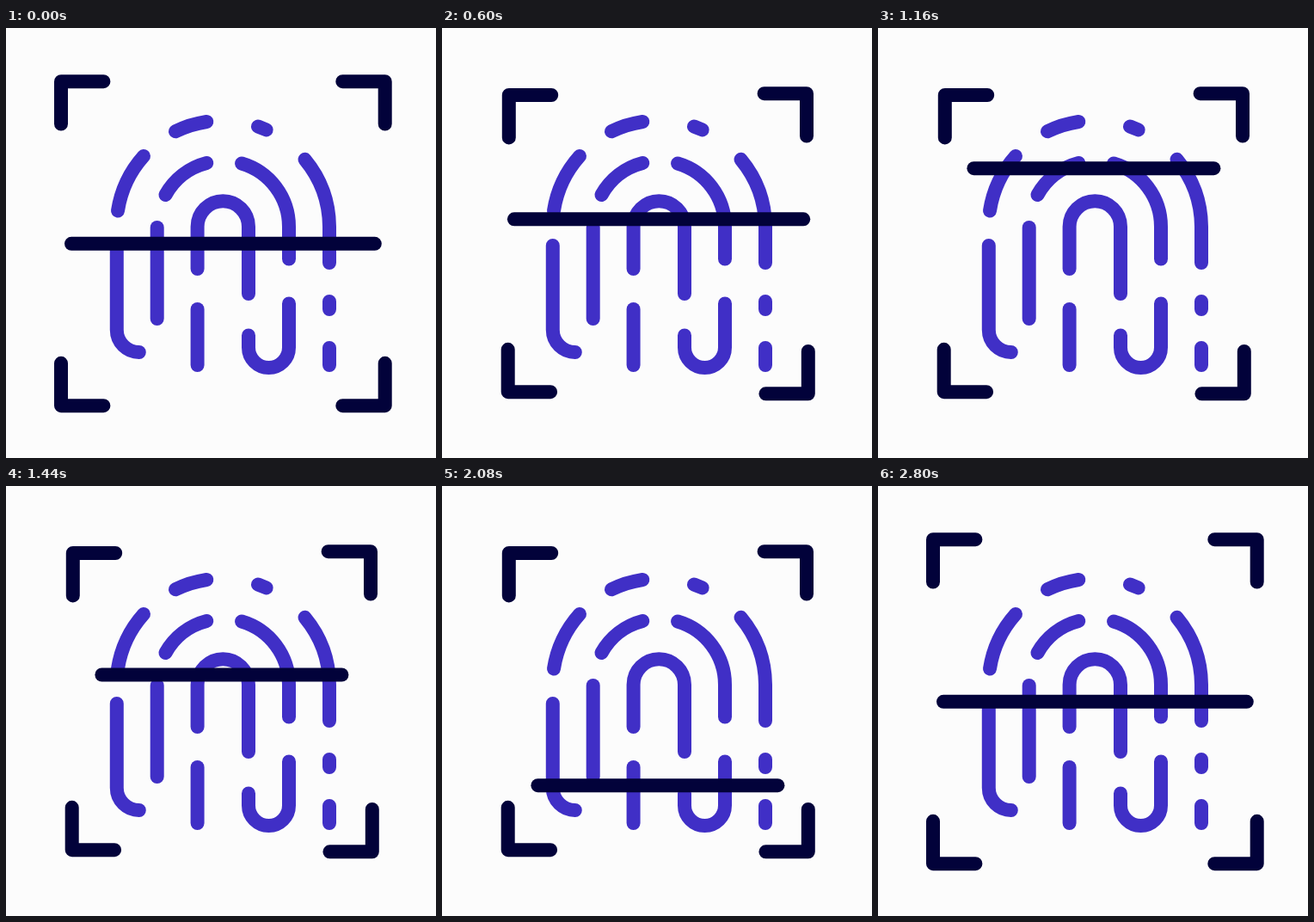
These frames come from a looping animation (500x500 px, 2.88 s). An HTML page:

```html
<!DOCTYPE html>
<html lang="en">
<head>
<meta charset="utf-8">
<title>Fingerprint scan</title>
<style>
  html, body { margin: 0; width: 100%; height: 100%; overflow: hidden; background: #fcfcfc; }
  svg { display: block; width: 100%; height: 100%; }
  path { fill: none; stroke-width: 16; stroke-linecap: round; stroke-linejoin: round; }
  .print { stroke: #402fc6; }
  .frame { stroke: #02023a; }
</style>
</head>
<body>
<svg viewBox="0 0 500 500">
  <g class="print">
    <!-- outer ridge -->
    <path d="M130 212.5A123.6 123.6 0 0 1 160 149"/>
    <path d="M197 120.3A123.6 123.6 0 0 1 233.3 109"/>
    <path d="M293 114.5L302.7 118.4"/>
    <path d="M347.5 152.8A123.6 123.6 0 0 1 376 231V273"/>
    <path d="M376 318V327M376 372V392"/>
    <path d="M128.8 253V351A26 26 0 0 0 154.8 377"/>
    <!-- middle ridge -->
    <path d="M185.5 194A76.6 76.6 0 0 1 233.3 157"/>
    <path d="M274 157.5A76.6 76.6 0 0 1 329 231V268.5"/>
    <path d="M175.7 232V338"/>
    <path d="M282 357.5V371.5A23.5 23.5 0 0 0 329 371.5V320.5"/>
    <!-- inner ridge -->
    <path d="M222.6 280V231A29.7 29.7 0 0 1 282 231V309"/>
    <path d="M222.6 327V392"/>
  </g>
  <g class="frame" id="frame"></g>
</svg>
<script>
const LOOP = 2880, STEP = 40, ARM = 49.4;
const RETURN = [2447, 2800];

// Each corner: resting point, closed-in point, arm directions, end of the move in
const corners = [
  { from: [64, 62.2], to: [77.8, 78], dir: [1, 1], end: 490 },
  { from: [440.7, 62.2], to: [424, 76.2], dir: [-1, 1], end: 444 },
  { from: [64, 439.2], to: [76.7, 423.2], dir: [1, -1], end: 412 },
  { from: [440.7, 439.2], to: [425.8, 425.3], dir: [-1, -1], end: 360 }
];

const group = document.getElementById('frame');
const addPath = () => group.appendChild(
  document.createElementNS('http://www.w3.org/2000/svg', 'path'));
corners.forEach(c => { c.path = addPath(); });
const bar = addPath();

const lerp = (a, b, p) => a + (b - a) * p;
const progress = (t, a, b) => Math.min(1, Math.max(0, (t - a) / (b - a)));
const ease = (t, a, b) => {
  const p = progress(t, a, b);
  return p * p * (3 - 2 * p);
};

function barY(t) {
  const top = 123, bottom = 380.3, rest = 250.8;
  if (t < 960) return lerp(rest, top, ease(t, 512, 800));
  if (t < RETURN[0]) return lerp(top, bottom, progress(t, 960, 2240));
  return lerp(bottom, rest, ease(t, ...RETURN));
}

function draw(t) {
  const back = ease(t, ...RETURN);
  for (const { from, to, dir, end, path } of corners) {
    const p = ease(t, 40, end) - back;
    const x = lerp(from[0], to[0], p), y = lerp(from[1], to[1], p);
    path.setAttribute('d', `M${x + dir[0] * ARM} ${y}H${x}V${y + dir[1] * ARM}`);
  }
  const shrink = ease(t, 512, 800) - back;
  bar.setAttribute('d',
    `M${lerp(76, 111.4, shrink)} ${barY(t)}H${lerp(428.8, 390.4, shrink)}`);
}

const start = performance.now();
function tick() {
  const t = (performance.now() - start) % LOOP;
  draw(Math.floor(t / STEP) * STEP);
  requestAnimationFrame(tick);
}
tick();
</script>
</body>
</html>
```
